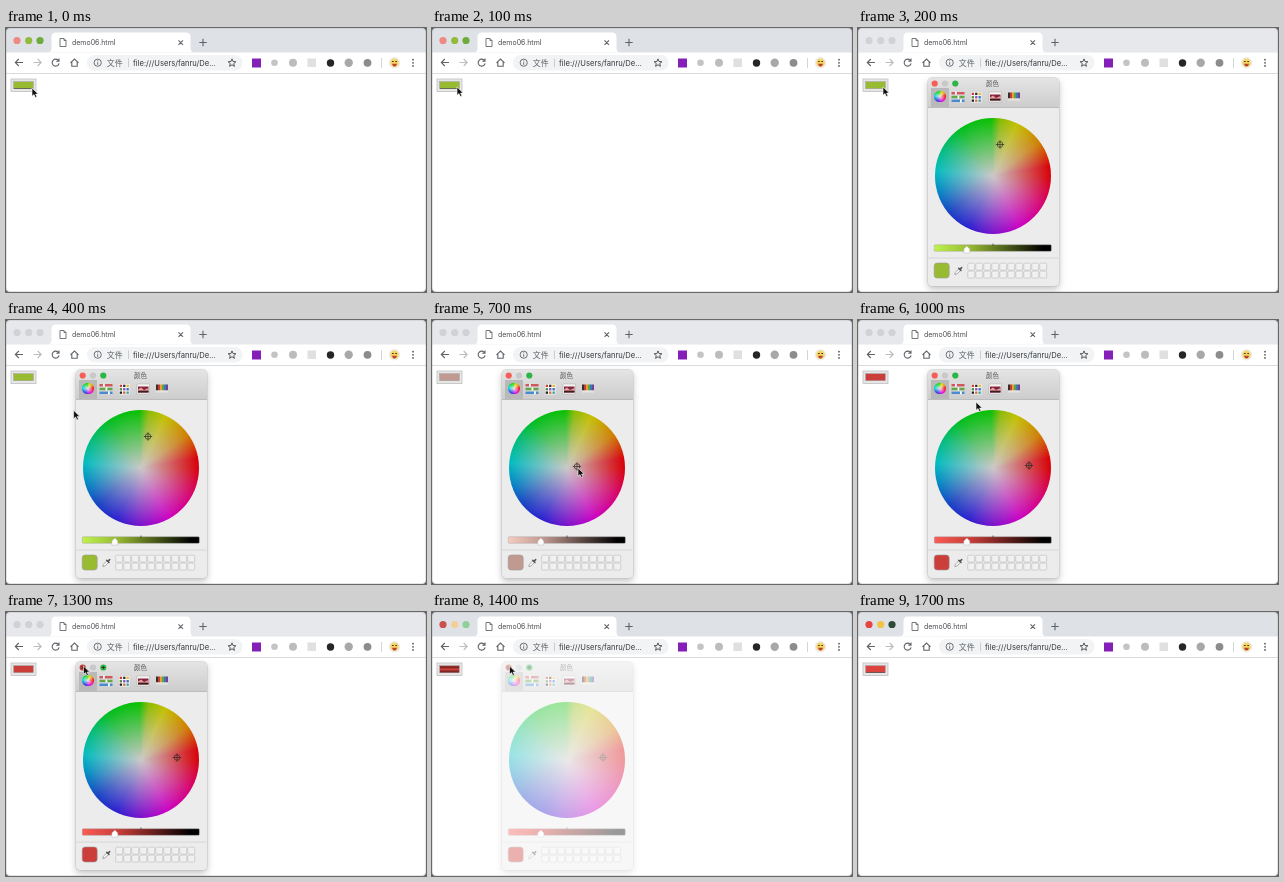
Recreate the animation shown at these times as an HTML page. Size 420x264 px, loop 1900 ms.

```html
<!DOCTYPE html>
<html lang="zh">
<head>
<meta charset="utf-8">
<title>demo06.html</title>
<style>
html, body { margin: 0; width: 100%; height: 100%; overflow: hidden; background: #fff; }
#stage { position: relative; width: 420px; height: 264px; overflow: hidden; background: #fff; }
svg { position: absolute; left: 0; top: 0; display: block; overflow: visible; }
text { font-family: Inter, "Noto Sans CJK SC", "Noto Sans CJK", sans-serif; }
#panel {
  position: absolute; left: 70px; top: 49.5px; width: 130.5px; height: 208px;
  border-radius: 4px; background: #ececec;
  box-shadow: 0 0 0 .5px #c4c4c4, 0 3px 7px rgba(0, 0, 0, .25);
}
.head {
  position: absolute; width: 100%; height: 29.5px; border-radius: 4px 4px 0 0;
  background: linear-gradient(#e4e4e4, #cdcdcd); border-bottom: .5px solid #bcbcbc;
}
.selected { position: absolute; left: 3px; top: 10.5px; width: 18px; height: 19px; background: #b9b9b9; }
.wheel {
  position: absolute; border-radius: 50%;
  background:
    radial-gradient(closest-side, #cbc8c8, rgba(203, 200, 200, 0)),
    conic-gradient(from 90deg, #d80008, #d80070 30deg, #cc00c4 62deg, #7a10cc 90deg,
      #2a1ed0 115deg, #1440c4 140deg, #0088c4 165deg, #00bcc0 185deg, #00bc80 208deg,
      #00be1c 235deg, #08c000 268deg, #8cba00 278deg, #c4c000 295deg, #d07c00 325deg, #d80008 350deg);
}
.big { left: 6.7px; top: 40.2px; width: 116.500px; height: 116.500px; }
.small { left: 6.3px; top: 13.300px; width: 11.500px; height: 11.500px; filter: brightness(1.15); }
</style>
</head>
<body>
<div id="stage">
  <svg width="420" height="264" viewBox="0 0 420 264">
    <path id="strip" d="M0 0H420V24.5H0Z"/>
    <path d="M41 24.5Q45.5 24.5 45.5 20V9Q45.5 4.5 50 4.5H180Q184.500 4.5 184.500 9V20Q184.500 24.5 189 24.500Z" fill="#fff"/>
    <path d="M0 45.5H420" stroke="#d9dbde"/>
    <g id="lights"></g>
    <path d="M54 10.500H58L60 12.500V18.500H54ZM58 10.500V12.500H60" fill="none" stroke="#666a6e" stroke-width=".9"/>
    <text x="66" y="17.200" font-size="7" fill="#494c50">demo06.html</text>
    <g fill="none" stroke="#5f6368" stroke-width="1.1">
      <path d="M172.500 12.300L177 16.800M177 12.300L172.500 16.800M193.300 14.500H200.700M197 10.800V18.200"/>
      <path d="M17 34.500H9.300M12.800 31L9.300 34.500L12.800 38"/>
      <path d="M27.500 34.500H35.200M31.700 31L35.200 34.500L31.700 38" stroke="#babcbe"/>
      <path d="M52.600 32.700A3.500 3.500 0 1 0 53.100 35.400M53 30.500V33.200H50.300"/>
      <path d="M64.500 34.800L68.500 31L72.500 34.800M65.800 34V38.300H71.200V34"/>
    </g>
    <rect x="81" y="27" width="155.500" height="15.500" rx="7.750" fill="#f1f3f4"/>
    <g fill="none" stroke="#5f6368" stroke-width=".9">
      <circle cx="91.700" cy="34.700" r="3.600"/>
      <path d="M91.700 34.200V36.800M91.700 32.400V33.300"/>
      <path d="M122.500 30.500V39" stroke="#b9bcc0" stroke-width=".7"/>
      <path id="star" stroke="#44474b"/>
    </g>
    <text x="100.800" y="37.700" font-size="8" fill="#5f6368">文件</text>
    <text x="127" y="37.500" font-size="7.600" fill="#36393d">file:///Users/fanru/De...</text>
    <rect x="246" y="30.500" width="9" height="9" fill="#8420b8"/>
    <circle cx="268.500" cy="34.800" r="3.300" fill="#c4c4c4"/>
    <circle cx="287" cy="34.800" r="4" fill="#bcbcbc"/>
    <rect x="301.500" y="30.500" width="8.500" height="8.500" fill="#e0e0e0"/>
    <circle cx="324.500" cy="35" r="3.700" fill="#262626"/>
    <circle cx="342.700" cy="34.800" r="4.200" fill="#a8a8a8"/>
    <circle cx="361.500" cy="34.800" r="3.900" fill="#8c8c8c"/>
    <path d="M375.500 30V40" stroke="#d3d5d8"/>
    <circle cx="388.500" cy="34.800" r="5.700" fill="#ececec"/>
    <circle cx="388.500" cy="34.800" r="4.300" fill="#f4d566"/>
    <path d="M386 33.500H387.700M389.300 33.500H391" stroke="#50351b"/>
    <path d="M386 35.800H391Q390.500 38.500 388.500 38.500T386 35.800Z" fill="#b8433b"/>
    <g fill="#55585c"><circle cx="407" cy="31.700" r=".9"/><circle cx="407" cy="34.800" r=".9"/><circle cx="407" cy="37.900" r=".9"/></g>
    <rect x="5" y="51" width="25" height="12.500" fill="#e6e6e6" stroke="#c0c0c0" stroke-width=".8"/>
    <rect id="input" x="7.700" y="53.700" width="19.600" height="7" stroke="#9a9a9a" stroke-width=".5"/>
    <path id="shade" stroke="#333" stroke-opacity=".55" d="M8 60.500H27"/>
    <path id="press" stroke="#401414" stroke-opacity=".55" stroke-width="2" d="M8 55.200H27M8 59.500H27"/>
    <path d="M0 4V0H4Q0 0 0 4ZM416 0H420V4Q420 0 416 0ZM0 260V264H4Q0 264 0 260ZM416 264H420V260Q420 264 416 264Z" fill="#555"/>
    <rect x=".25" y=".25" width="419.500" height="263.500" rx="4" fill="none" stroke="#b5b7ba" stroke-width=".5"/>
  </svg>

  <div id="panel">
    <div class="head"></div>
    <div class="selected"></div>
    <div class="wheel big"></div>
    <div class="wheel small"></div>
    <svg width="130.500" height="208" viewBox="70 49.500 130.500 208">
      <defs>
        <linearGradient id="ramp">
          <stop id="light"/><stop id="mid" offset=".3"/><stop offset=".93" stop-color="#000"/>
        </linearGradient>
      </defs>
      <g id="panelLights"></g>
      <text x="134.500" y="57.300" font-size="6.500" fill="#555" text-anchor="middle">颜色</text>
      <g id="tools"></g>
      <path d="M131 63.500H143.500V73.500H131Z" fill="#f8f4f2" stroke="#999" stroke-width=".4"/>
      <path d="M132 66H142.500V72H132Z" fill="#83243e"/>
      <path d="M132 69L135 67L138 69.500L142.500 67.500V70H132Z" fill="#e5a1a0"/>
      <path d="M132 70.500H142.500V72H132Z" fill="#35201f"/>
      <g id="cross" fill="none" stroke="#222" stroke-width=".65">
        <circle r="2.800"/><path d="M-4.200 0H4.200M0 -4.200V4.200"/>
      </g>
      <rect x="76.300" y="216.300" width="117" height="6.500" rx="1" fill="url(#ramp)" stroke="#999" stroke-width=".4"/>
      <path d="M135 215V217.500" stroke="#444" stroke-width=".8"/>
      <path d="M108.800 217.500L111.800 220.500V224.500H105.800V220.500Z" fill="#fff" stroke="#aaa" stroke-width=".4"/>
      <path d="M70 229.500H200.500" stroke="#d6d6d6"/>
      <rect id="well" x="76.200" y="234.500" width="15" height="15" rx="3" stroke="#999" stroke-width=".6"/>
      <path d="M96.800 246L97.300 243.800L101 240.200L102.600 241.800L99 245.500Z" fill="#f8f8f8" stroke="#777" stroke-width=".6"/>
      <path d="M100.700 239.700L103 242M101.900 240.900L103.700 239.100" stroke="#555" stroke-width="1.500" stroke-linecap="round"/>
      <g id="cells" fill="#f1f1f1" stroke="#c2c2c2" stroke-width=".7"></g>
    </svg>
  </div>

  <svg width="420" height="264" viewBox="0 0 420 264">
    <path id="cursor" d="M0 0V8.300L2 6.600L3.400 9.600L4.900 8.900L3.600 6.100H6.200Z" fill="#111" stroke="#fff" stroke-width=".6"/>
  </svg>
</div>

<script>
const $ = id => document.getElementById(id);
const set = (el, attrs) => { for (const k in attrs) el.setAttribute(k, attrs[k]); return el; };
const add = (parent, tag, attrs) =>
  parent.appendChild(set(document.createElementNS("http://www.w3.org/2000/svg", tag), attrs));
const show = (el, on) => { el.style.display = on ? "" : "none"; };

const LOOP = 1900, STEP = 100, OPEN = 200, CLOSE = 1400, GONE = 1500;
const GREEN = { fill: [152, 187, 50], light: [190, 242, 78], at: [142, 116] };
const ROSE = { fill: [192, 153, 144], light: [248, 204, 193], at: [145, 146] };
const RED = { fill: [203, 62, 57], light: [250, 92, 86], at: [171, 145] };

// Window button colours from a given time on.
const LIGHTS = [
  [0, ["#ee8983", "#91bb3b", "#6dac3c"]],
  [OPEN, ["#d0d2d6", "#d0d2d6", "#d0d2d6"]],
  [CLOSE, ["#c9524c", "#f3cf98", "#91cf98"]],
  [GONE, ["#e5463f", "#f2c344", "#2f4a35"]]
];

const linear = p => p;
const easeOut = p => p * (2 - p);
const smooth = p => p * p * (3 - 2 * p);
// Pointer tip: time, place, easing towards the next row.
const PATH = [
  [0, [26, 60], linear],
  [100, [25, 59], linear],
  [200, [25, 59], smooth],
  [700, [146, 148], smooth],
  [900, [172, 147], linear],
  [1000, [118, 82], easeOut],
  [1300, [77.5, 54], linear],
  [1500, [77.5, 54], linear]
];

const mix = (a, b, p) => a.map((v, i) => v + (b[i] - v) * p);
const rgb = c => `rgb(${c.map(Math.round)})`;
const last = (steps, t) => steps.filter(s => s[0] <= t).pop();

function pointerAt(t) {
  const from = last(PATH, t), to = PATH[PATH.indexOf(from) + 1];
  return to ? mix(from[1], to[1], from[2]((t - from[0]) / (to[0] - from[0]))) : from[1];
}

// The mark follows the drag from rose to red.
function pickAt(t) {
  if (t < 700) return GREEN;
  const p = smooth(Math.min(1, (t - 700) / 200)), pick = {};
  for (const k in ROSE) pick[k] = mix(ROSE[k], RED[k], p);
  return pick;
}

const dots = (parent, xs, y, r) => xs.map(cx => add(parent, "circle", { cx, cy: y, r }));
const lights = dots($("lights"), [11, 22.7, 34], 12.5, 3.6);
const panelLights = dots($("panelLights"), [76.7, 87, 97.3], 55, 3.1);
const marks = add($("panelLights"), "path", {
  d: "M75.300 53.600L78.100 56.400M78.100 53.600L75.300 56.400M95.700 55H98.900M97.300 53.400V56.600",
  stroke: "#40201c", "stroke-width": .9
});

const star = Array.from({ length: 10 }, (_, i) => {
  const r = i % 2 ? 1.8 : 4.1, a = i * Math.PI / 5;
  return [226 + r * Math.sin(a), 35 - r * Math.cos(a)].map(v => v.toFixed(2)).join(" ");
});
set($("star"), { d: `M${star.join("L")}Z` });

const tools = $("tools");
const box = (x, y, width, height, fill) => add(tools, "rect", { x, y, width, height, fill });
["#d0575c", "#61a747", "#488bd0"].forEach((c, i) => {
  box(93.5, 63.500 + i * 3.8, 13, 2.4, c);
  box(97 + i * 2.5, 63.200 + i * 3.8, 1.8, 3, "#fff");
});
box(113, 63.500, 10.500, 10.500, "#f4f4f4");
["#d03b3b", "#333", "#e5b531", "#4a8c39", "#8c4bb0", "#3169bd", "#222", "#d56d32", "#35a0a2"]
  .forEach((c, i) => box(113.7 + i % 3 * 3.4, 64.2 + Math.floor(i / 3) * 3.4, 2.3, 2.3, c));
["#3a2d2b", "#c43e39", "#e7a136", "#5ca448", "#3b77ba", "#6f438f"].forEach((c, i) => {
  box(150 + i * 2, 64, 2, 6, c);
  add(tools, "path", { d: `M${150 + i * 2} 70h2l-1 3z`, fill: "#f3ece4" });
});

for (let i = 0; i < 20; i++)
  add($("cells"), "rect", {
    x: 109.7 + i % 10 * 8, y: 234.700 + Math.floor(i / 10) * 7.9, width: 7, height: 6.9, rx: 1
  });

function draw(t) {
  const pick = pickAt(t), fill = rgb(pick.fill);
  const idle = t < OPEN || t >= GONE;
  set($("strip"), { fill: t >= OPEN && t < CLOSE ? "#e7e8ec" : "#dee1e6" });
  set($("input"), { fill: t >= GONE ? "#dc443d" : fill });
  set($("well"), { fill });
  set($("light"), { "stop-color": rgb(pick.light) });
  set($("mid"), { "stop-color": fill });
  set($("cross"), { transform: `translate(${pick.at})` });
  show($("shade"), idle);
  show($("press"), t >= CLOSE && t < GONE);

  const top = last(LIGHTS, t)[1];
  lights.forEach((dot, i) => set(dot, { fill: top[i] }));
  const pop = [t >= 1300 ? "#c23b37" : "#f65f58", "#c8c8c8", "#2db648"];
  panelLights.forEach((dot, i) => set(dot, { fill: pop[i] }));
  show(marks, t >= 1200);
  $("panel").style.opacity = idle ? 0 : t >= CLOSE ? .4 : 1;

  set($("cursor"), { transform: `translate(${pointerAt(t)})` });
  show($("cursor"), t <= GONE);
}

const start = performance.now();
function tick() {
  const t = (performance.now() - start) % LOOP;
  draw(Math.floor(t / STEP) * STEP);
  requestAnimationFrame(tick);
}
tick();
</script>
</body>
</html>
```
